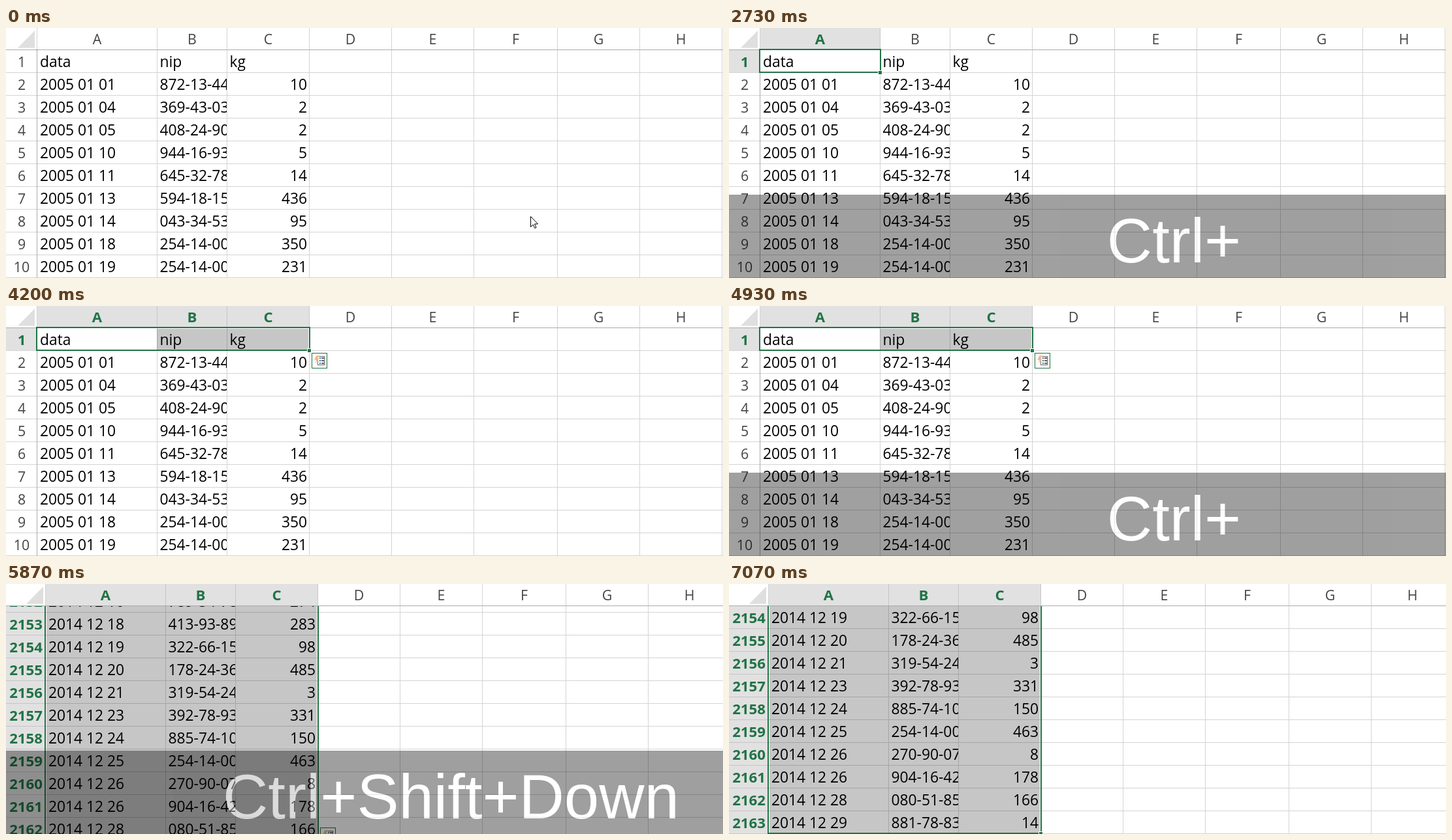
Write an HTML page that moves like this. It is 1098x384 px and loops after 7.14 s.

```html
<!DOCTYPE html>
<html lang="pl">
<head>
<meta charset="utf-8">
<title>Spreadsheet shortcuts</title>
<style>
html, body { margin: 0; width: 100%; height: 100%; overflow: hidden; background: #fff; }
svg { display: block; }
text { white-space: pre; font-family: "Open Sans", "Noto Sans", sans-serif; }
.cell { font-size: 22.8px; fill: #000; }
.head { font-size: 21.3px; fill: #444; text-anchor: middle; }
.on { font-size: 22.2px; font-weight: 700; fill: #217346; }
.end { text-anchor: end; }
.keys { font: 96px "Liberation Sans", Arial, sans-serif; fill: #fff; text-anchor: middle; }
rect { shape-rendering: crispEdges; }
</style>
</head>
<body>
<svg id="stage" width="1098" height="384" viewBox="0 0 1098 384"></svg>
<script>
const LOOP = 7140, TICK = 1000 / 15;
const GREEN = '#217346', GRID = '#d4d4d4', EDGE = '#ababab', HEAD_ON = '#e1e1e1', FILL = '#c6c6c6';
const ROW_H = 35, TOP = 33, LAST = 2163;
const COLS = [47, 231, 338, 464, 590, 716, 844, 970, 1096];
const stage = document.getElementById('stage');

const parse = list => list.split('|').map(line => line.split(','));
const firstRows = parse('data,nip,kg|2005 01 01,872-13-44,10|2005 01 04,369-43-03,2|' +
  '2005 01 05,408-24-90,2|2005 01 10,944-16-93,5|2005 01 11,645-32-78,14|' +
  '2005 01 13,594-18-15,436|2005 01 14,043-34-53,95|2005 01 18,254-14-00,350|2005 01 19,254-14-00,231');
const lastRows = parse('2014 12 10,392-78-93,54|2014 12 12,904-16-42,311|2014 12 13,254-14-00,127|' +
  '2014 12 14,178-24-36,16|2014 12 16,789-54-78,274|' +
  '2014 12 18,413-93-89,283|2014 12 19,322-66-15,98|2014 12 20,178-24-36,485|2014 12 21,319-54-24,3|' +
  '2014 12 23,392-78-93,331|2014 12 24,885-74-10,150|2014 12 25,254-14-00,463|2014 12 26,270-90-07,8|' +
  '2014 12 26,904-16-42,178|2014 12 28,080-51-85,166|2014 12 29,881-78-83,14');

const box = (x, y, w, h, fill) => `<rect x="${x}" y="${y}" width="${w}" height="${h}" fill="${fill}"/>`;
const label = (x, y, cls, s) => `<text x="${x}" y="${y}" class="${cls}">${s}</text>`;
const smooth = p => p * p * (3 - 2 * p);

function cursorAt(n) {
  if (n >= 22) return null;
  if (n >= 21) return [149, 6];
  if (n >= 20) return [149, 20];
  if (n >= 15) return [149, 35];
  const p = smooth(Math.min(n / 11, 1));
  return [Math.round(803 - 654 * p), Math.round(289 - 243 * p)];
}

function keysAt(n) {
  if (n >= 84) return n < 99 ? 'Ctrl+Shift+Down' : '';
  if (n >= 76) return 'Ctrl+Shift+';
  if (n >= 74) return 'Ctrl+';
  if (n >= 63) return '';
  if (n >= 48) return 'Ctrl+Shift+Right';
  if (n >= 42) return 'Ctrl+Shift+';
  return n >= 41 ? 'Ctrl+' : '';
}

function stateAt(n) {
  const far = n >= 86;
  return {
    far,
    lag: far ? [180, 95, 45, 18, 5, 0][Math.min(n - 86, 5)] : 0,
    cols: n < 14 ? 0 : n < 49 ? 1 : 3,
    right: n < 49 ? 232 : 465 - [128, 47, 12, 0][Math.min(n - 49, 3)],
    hover: n === 20 || n === 21,
    icon: far ? (n < 106 ? [481, 374] : null) : (n >= 52 && n < 84 ? [468, 72] : null),
    cursor: cursorAt(n),
    keys: keysAt(n)
  };
}

function visibleRows(s) {
  const data = s.far ? lastRows : firstRows;
  const firstNo = s.far ? LAST - lastRows.length + 1 : 1;
  return data.map((cells, i) => ({
    cells, no: firstNo + i,
    y: TOP + ROW_H * (s.far ? i - (lastRows.length - 10) : i) + s.lag
  })).filter(r => r.y > TOP - ROW_H && r.y < 384);
}

function drawCells(s, rows) {
  let out = '', names = '';
  const bottom = s.far ? TOP + ROW_H * 10 + s.lag : 68;
  if (s.far) out += box(49, TOP, 414, bottom - TOP - 1, FILL);
  else if (s.cols > 1) out += box(232, 35, s.right - 234, 32, FILL);
  for (const r of rows) out += box(47, r.y + ROW_H, 1051, 1, GRID);
  for (const x of COLS.slice(1)) out += box(x, TOP, 1, 351, GRID);
  if (s.far) {
    for (const r of rows) out += box(49, r.y + ROW_H, 414, 1, '#a6a6a6');
    for (const x of [231, 338]) out += box(x, TOP, 1, bottom - TOP, '#a6a6a6');
  } else if (s.cols > 1) {
    for (const x of [231, 338]) if (x < s.right) out += box(x, 35, 1, 32, '#a6a6a6');
  }
  for (const { cells: [date, id, kg], y, no } of rows) {
    out += label(52, y + 27, 'cell', date);
    names += label(235.5, y + 27, 'cell', id);
    out += no === 1 ? label(342.5, y + 27, 'cell', kg) : label(461, y + 27, 'cell end', kg);
  }
  return out + `<g clip-path="url(#colB)">${names}</g>`;
}

function drawColumnHeads(s) {
  let out = '';
  COLS.slice(0, 8).forEach((x, i) => {
    const on = i < s.cols, w = COLS[i + 1] - x;
    if (on) out += box(x + 1, 0, w, TOP, s.hover && i === 0 ? '#9fd5b7' : HEAD_ON);
    out += box(COLS[i + 1], 0, 1, TOP, on ? FILL : GRID);
    out += label(x + w / 2 + .5, 25, on ? 'head on' : 'head', 'ABCDEFGH'[i]);
  });
  return out;
}

function drawRowHeads(s, rows, width) {
  let out = '';
  for (const r of rows) {
    const on = s.far || (s.cols > 0 && r.no === 1);
    out += box(0, r.y + 1, width, ROW_H, on ? HEAD_ON : '#fff');
    out += box(0, r.y + ROW_H, width, 1, s.far ? FILL : GRID);
    out += label(width / 2 + .5, r.y + 27, on ? 'head on' : 'head', r.no);
  }
  return out + box(width, TOP, 1, 351, EDGE);
}

function drawBorder(s) {
  if (!s.cols) return box(46, 33, 2, 1, '#4fa67c');
  const top = s.far ? 34 : 32;
  const bottom = s.far ? TOP + ROW_H * 10 + s.lag + 1 : 69;
  const r = s.right;
  let out = box(46, top, 2, bottom - top, GREEN);
  if (!s.far) out += box(46, 32, r - 45, 2, GREEN);
  return out + box(r - 1, top, 2, bottom - top, GREEN) + box(46, bottom - 2, r - 45, 2, GREEN) +
    box(r - 4, bottom - 4, 7, 7, '#fff') + box(r - 3, bottom - 3, 5, 5, GREEN);
}

function drawIcon([x, y]) {
  let lines = '';
  for (const ly of [7, 11, 15]) lines += box(12, ly, 2, 2, '#4472a8') + box(15, ly, 4, 2, '#666');
  return `<g transform="translate(${x} ${y})">` + box(0, 0, 24, 24, GREEN) + box(1, 1, 22, 22, '#fff') +
    box(9, 5, 11, 14, '#666') + box(10, 6, 9, 12, '#fff') + lines +
    '<path d="M7 4h5l-3 5h3l-7 8 2-6H4z" fill="#f0b47a" stroke="#fff" stroke-width=".6"/></g>';
}

function drawCursor([x, y]) {
  return `<path transform="translate(${x} ${y})" d="M.5 .5V16.5L4.2 13L6.8 18.5L9 17.5L6.5 12H11.5Z" fill="#fff" stroke="#000"/>`;
}

function drawKeys(keys) {
  return `<g opacity=".373">${box(0, 256, 1098, 128, '#000')}${label(681.5, 360, 'keys', keys)}</g>`;
}

function draw(n) {
  const s = stateAt(n), rows = visibleRows(s);
  const dx = s.far ? 13 : 0;
  const shift = inner => `<g transform="translate(${dx} 0)">${inner}</g>`;
  stage.innerHTML =
    '<defs><clipPath id="colB"><rect x="232" y="0" width="106" height="384"/></clipPath></defs>' +
    box(0, 0, 1098, 384, '#fff') +
    shift(drawCells(s, rows)) +
    drawRowHeads(s, rows, 47 + dx) +
    box(0, 0, 1098, TOP, '#fff') +
    shift(drawColumnHeads(s) + '<path d="M18 30.5H44V4Z" fill="#dfdfdf"/>' + box(47, 0, 1, TOP, GRID)) +
    box(0, TOP, 1098, 1, EDGE) +
    shift(drawBorder(s)) +
    (s.icon ? drawIcon(s.icon) : '') +
    (s.keys ? drawKeys(s.keys) : '') +
    (s.cursor ? drawCursor(s.cursor) : '');
}

let shown = -1;
const start = performance.now();
function frame() {
  const t = (performance.now() - start) % LOOP;
  const n = Math.min(Math.floor((t + 4) / TICK), 106);
  if (n !== shown) draw(shown = n);
  requestAnimationFrame(frame);
}
frame();
</script>
</body>
</html>
```
